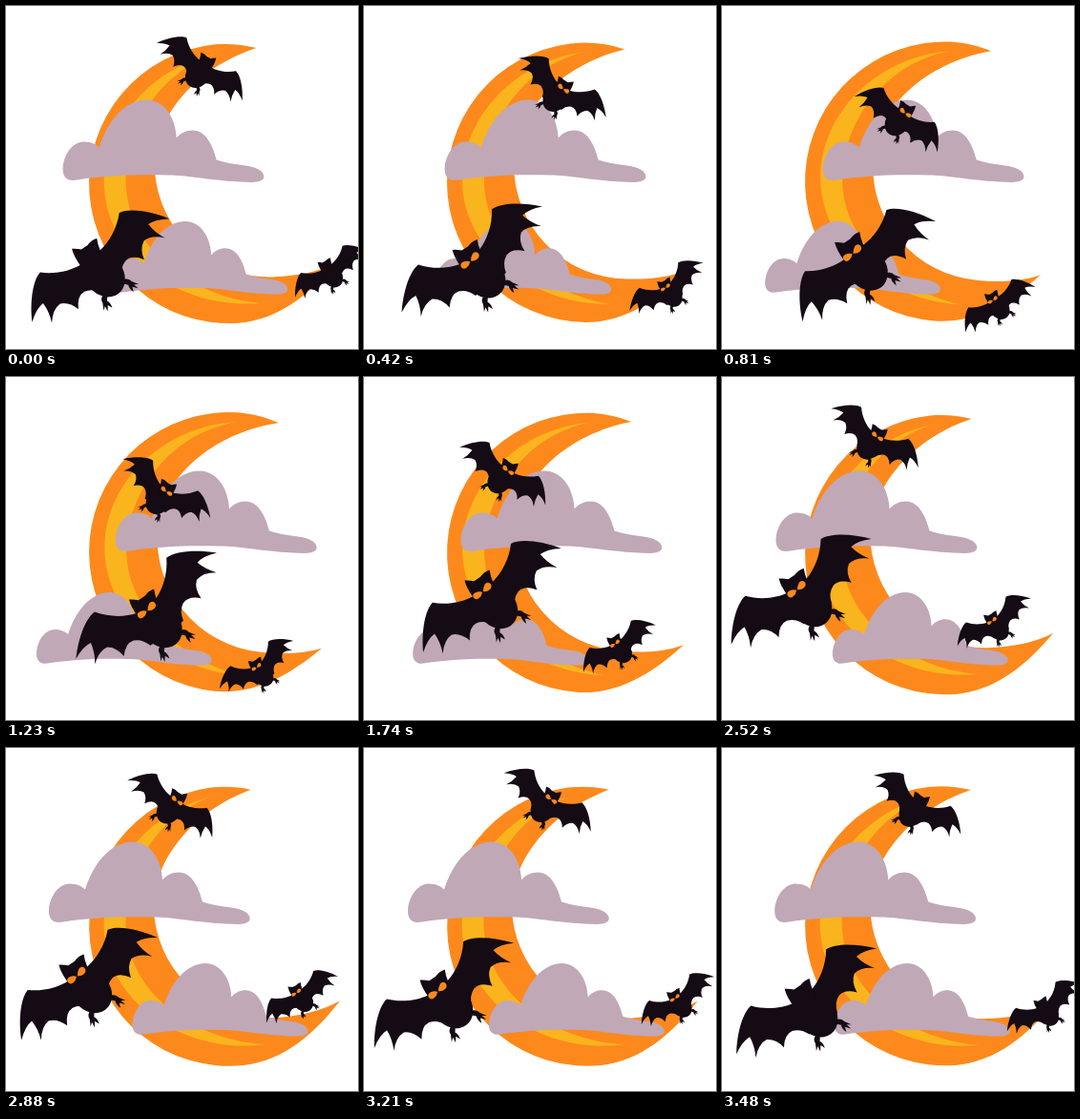
Recreate the animation shown at these times as an HTML page. Size 369 by 360 pixels, loop 3510 ms.

```html
<!DOCTYPE html>
<html lang="en">
<head>
<meta charset="utf-8">
<title>Moon and bats</title>
<style>
html, body { margin: 0; width: 100%; height: 100%; overflow: hidden; background: #fff; }
svg { display: block; width: 100vw; height: 100vh; }
</style>
</head>
<body>
<svg viewBox="0 0 369 360">
  <defs>
    <path id="cloud" fill="#c0a8b7" d="M0 168C2 152 12 142 22 142C30 142 35 145 38 148C46 122 64 98 88 98C104 98 118 114 119 138C123 133 129 130 136 130C150 130 157 146 161 161C180 167 195 166 203 170C210 173 212 178 210 181C205 186 195 184 185 184C150 182 130 177 110 177C70 176 40 178 15 182C5 184-1 180 0 168Z"/>
    <path id="wing" d="M0 4L13 3C24 2 40-4 52-16C63-14 79 2 90 21Q78 12 69 12Q69 23 74 34Q65 23 55 23Q46 27 43 39Q36 27 27 28Q18 30 13 40L0 38Z"/>
    <path id="foot" d="M9 44L15 43Q19 45 19 49L23 56L19 53L20 59L16 54L14 59Q12 53 14 50Z"/>
    <g id="torso">
      <ellipse cy="27" rx="20" ry="24"/>
      <use href="#foot"/>
      <use href="#foot" transform="scale(-1 1)"/>
      <path d="M-14 5Q-14-8-10.500-16Q-6-13-3-9.500L5-9Q11-11 17-9Q14-4 12 4Q9 17-1 17Q-12 16-14 5Z"/>
    </g>
    <g id="eyes" fill="#fd891c">
      <path d="M-14 4Q-13 0-9 1Q-5 2-3 5Q-6 8-10 8Q-14 8-14 4Z"/>
      <path d="M9 3Q8-1 4 0Q0 2-2 5Q1 8 5 7.500Q9 7 9 3Z"/>
    </g>
  </defs>
  <g id="moon">
    <path fill="#fd891c" d="M273 45.500C260 41 245 38.500 230 38.500A147 147 0 0 0 87 185A147 147 0 0 0 232 332C275 332 310 307 340 276.500C320 285 297 287 275 286.500A120 120 0 0 1 157 166C157 114 205 62 273 45.500Z"/>
    <path fill="#fab41e" d="M229 48.500C160 58 103 115 103 183C103 255 175 314 258 313C190 302 126 250 126 183C126 125 165 65 229 48.500Z"/>
  </g>
  <use id="low" href="#cloud"/>
  <use id="high" href="#cloud"/>
  <g id="bats" fill="#140b14"></g>
</svg>
<script>
const LOOP = 3510, SWAY = 3570, FLAP = 714, TURN = 2 * Math.PI;
const { sin, cos } = Math;

// Each bat circles a centre: [centre, cos, sin, cos of double, sin of double]
const BATS = [
  { tilt: 34, scale: '-.6 .6', x: [179.5, -9, -29.5, -2, 0], y: [80, 33, -2, 4, -3] },
  { tilt: -33, scale: '.5', x: [292, -25.5, -26, -4, 6.5], y: [277, 23, -14, 2, -2.5] },
  { tilt: -37, scale: '1', x: [105.5, 36.5, -4.6, 5, 0], y: [239, -0.4, -25.5, 1.4, 1.5] }
];

const $ = id => document.getElementById(id);
const place = (el, value) => el.setAttribute('transform', value);
const wave = ([c, a, b, d, e], p) =>
  c + a * cos(p) + b * sin(p) + d * cos(2 * p) + e * sin(2 * p);

for (const bat of BATS) {
  bat.el = document.createElementNS('http://www.w3.org/2000/svg', 'g');
  bat.el.innerHTML = '<use href="#wing"/><use href="#wing"/><use href="#torso"/><use href="#eyes"/>';
  $('bats').append(bat.el);
}

function draw(t) {
  const p = (t - 1230) / SWAY * TURN, sway = cos(p);
  place($('moon'), `rotate(${6.1 * sway - 0.8} 249 185)`);
  place($('high'), `translate(${79.5 + 35.5 * sway} 0.5)`);
  place($('low'), `translate(${83 - 51 * sway} 139.3) scale(.872 .885)`);

  const flap = 3 - 10 * sin((t + 30) / FLAP * TURN);
  const awake = t > 150 && t < 3330;
  for (const { el, tilt, scale, x, y } of BATS) {
    const [right, left, , eyes] = el.children;
    place(el, `translate(${wave(x, p)} ${wave(y, p)}) rotate(${tilt}) scale(${scale})`);
    place(right, `rotate(${-flap})`);
    place(left, `scale(-1 1) rotate(${-flap})`);
    eyes.setAttribute('visibility', awake ? 'visible' : 'hidden');
  }
}

const start = performance.now();
function tick() {
  draw((performance.now() - start) % LOOP);
  requestAnimationFrame(tick);
}
draw(0);
requestAnimationFrame(tick);
</script>
</body>
</html>
```
